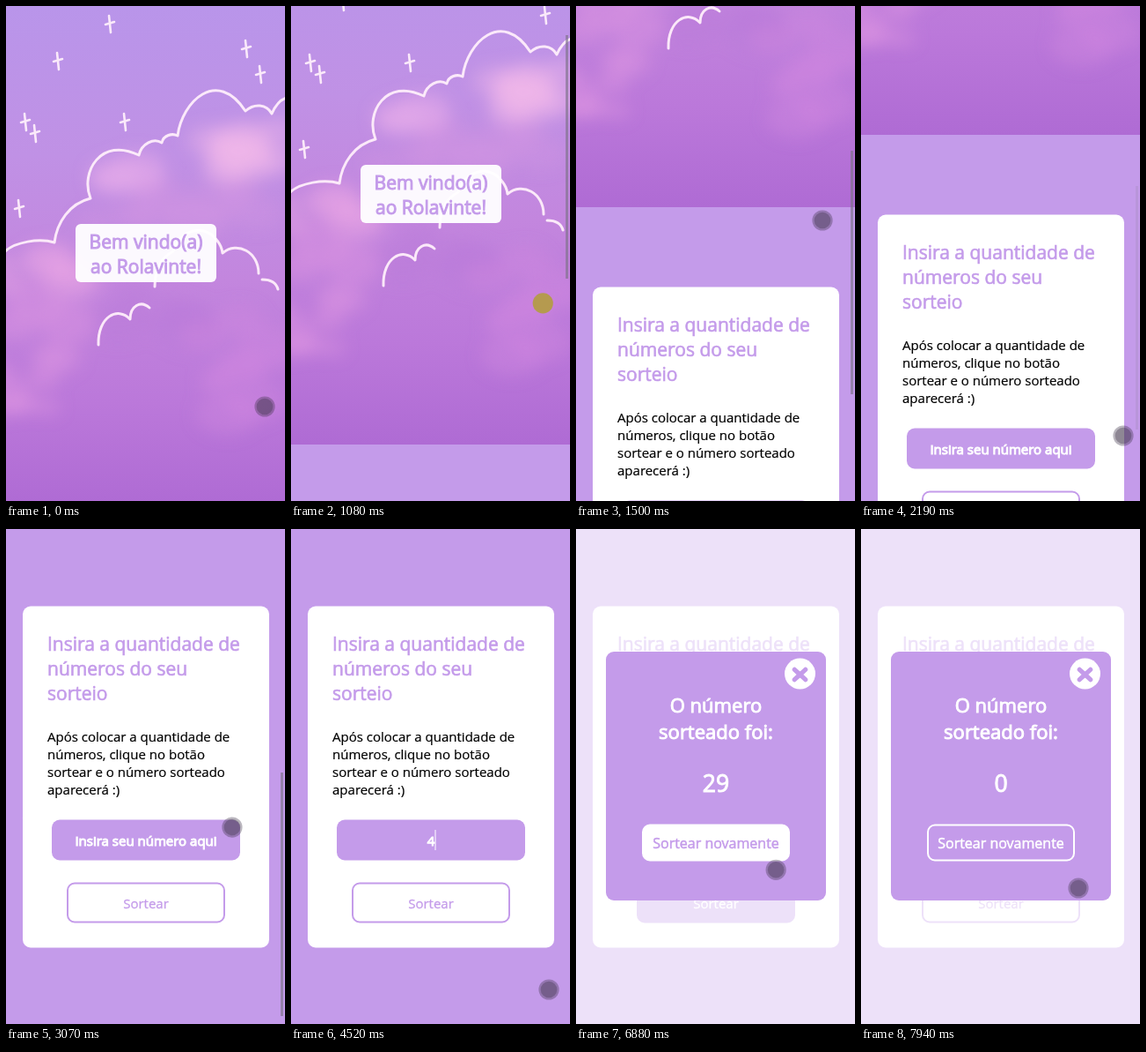
An HTML page for the animation above (8000 ms loop, 317 by 561 pixels).

```html
<!DOCTYPE html>
<html lang="pt">
<head>
<meta charset="utf-8">
<style>
  html, body { margin: 0; width: 100%; height: 100%; overflow: hidden; background: #c49bea; }
  svg { display: block; width: 317px; height: 561px; font-family: "Open Sans", "Noto Sans", sans-serif; }
  .mid { text-anchor: middle; }
  .thick { stroke: currentColor; stroke-width: 1px; }
  .semi { stroke: currentColor; stroke-width: .65px; }
  .white { fill: #fff; color: #fff; }
  .tint { fill: #c49bea; color: #c49bea; }
  .ink { fill: none; stroke: #fff0fb; stroke-width: 3; stroke-linecap: round; stroke-linejoin: round; opacity: .93; }
</style>
</head>
<body>
<svg viewBox="0 0 317 561">
  <defs>
    <linearGradient id="sky" x2="0" y2="1">
      <stop offset="0" stop-color="#b995ea"/>
      <stop offset=".3" stop-color="#c091e5"/>
      <stop offset=".55" stop-color="#c386de"/>
      <stop offset=".8" stop-color="#bb78da"/>
      <stop offset="1" stop-color="#af6bd4"/>
    </linearGradient>
    <filter id="soft" x="-30%" y="-30%" width="160%" height="160%"><feGaussianBlur stdDeviation="9"/></filter>
    <clipPath id="frame"><rect width="317" height="564"/></clipPath>
  </defs>
  <rect width="317" height="561" class="tint"/>
  <g id="page">
    <g clip-path="url(#frame)">
      <rect width="317" height="564" fill="url(#sky)"/>
      <g id="clouds" filter="url(#soft)"></g>
      <g class="ink">
        <path d="M-2 279C10 267 38 263 55 268C58 245 72 224 96 218C84 188 108 148 151 169C154 156 168 149 177 155C179 146 189 144 195 147C200 108 240 70 272 119C282 110 296 111 302 122C306 113 312 106 319 104"/>
        <path d="M169 318C169 300 176 285 190 278C200 250 228 248 240 266Q245 272 246 280C263 266 287 279 287 303"/>
        <path d="M291 310Q306 310 309 321M105 384C104 352 127 340 141 355C141 340 153 333 163 342"/>
        <path id="stars" stroke-width="2.6"/>
      </g>
      <rect x="79" y="247" width="160" height="66" rx="6" fill="#fff" opacity=".95"/>
      <g class="mid tint thick" font-size="21">
        <text x="159" y="274.5">Bem vindo(a)</text>
        <text x="159" y="302.5">ao Rolavinte!</text>
      </g>
    </g>
    <rect x="19" y="654.5" width="280" height="387" rx="9" fill="#fff"/>
    <g class="tint semi" font-size="21">
      <text x="47" y="705">Insira a quantidade de</text>
      <text x="47" y="733">números do seu</text>
      <text x="47" y="761">sorteio</text>
    </g>
    <g font-size="15" stroke="#000" stroke-width=".2">
      <text x="47" y="808">Após colocar a quantidade de</text>
      <text x="47" y="828">números, clique no botão</text>
      <text x="47" y="848">sortear e o número sorteado</text>
      <text x="47" y="868">aparecerá :)</text>
    </g>
    <rect x="52" y="896.5" width="214" height="46" rx="9" class="tint"/>
    <text id="field" class="mid white thick" x="159" y="925.5" font-size="15"></text>
    <rect id="caret" y="908" width="1" height="23" fill="#fff"/>
    <rect id="drawBox" x="70" y="968.5" width="178" height="44" rx="8" stroke="#c49bea" stroke-width="2"/>
    <text id="drawText" class="mid" x="159" y="997" font-size="15" stroke-width=".3">Sortear</text>
  </g>
  <g id="modal">
    <rect width="317" height="561" fill="#fff" opacity=".7"/>
    <rect x="34" y="139" width="250" height="282" rx="9" class="tint"/>
    <circle cx="254.5" cy="164" r="17.5" fill="#fff"/>
    <path d="M248.3 159.3l12.4 11.4m0 -11.4l-12.4 11.4" stroke="#c49bea" stroke-width="5.2" stroke-linecap="round"/>
    <g class="mid white thick">
      <text x="159" y="208" font-size="22">O número</text>
      <text x="159" y="238" font-size="22">sorteado foi:</text>
      <text id="result" x="159" y="297.5" font-size="26.5"></text>
    </g>
    <rect id="againBox" x="76" y="335.5" width="166" height="40" rx="8" stroke="#fff" stroke-width="2"/>
    <text id="againText" class="mid" x="159" y="362" font-size="16" stroke-width=".5">Sortear novamente</text>
  </g>
  <rect id="tap" fill="#33b5e5"/>
  <rect id="bar" x="312" width="3" height="276" fill="#7d7288"/>
  <g id="cursor"><circle r="11.6"/><circle r="9.3"/></g>
</svg>
<script>
const LOOP = 8000, LILAC = '#c49bea', OPEN = 5750, AGAIN = 7440;
const el = id => document.getElementById(id);
const set = (id, attrs) => { for (const k in attrs) el(id).setAttribute(k, attrs[k]); };
const ramp = (t, a, b) => Math.max(0, Math.min(1, (t - a) / (b - a)));
const smooth = k => k * k * (3 - 2 * k);
const within = (t, a, b) => t >= a && t < b;

// pointer moves: start, end, x, y
const moves = [
  [820, 1290, 280, 243], [1640, 2120, 298, 487], [2450, 2900, 266, 276],
  [2900, 3070, 257, 338], [3070, 3380, 242, 352], [3710, 4320, 293, 522],
  [4780, 5480, 170, 433], [5850, 6480, 241, 409], [6560, 7210, 213, 363], [7480, 7940, 247, 407]
];
// flings: start, end, distance
const flings = [[850, 1760, 418], [2480, 2790, 149]];
const clicks = [3570, 5600, 7410];

function pointerAt(t) {
  let x = 294, y = 454;
  for (const [a, b, nx, ny] of moves) {
    const k = ramp(t, a, b);
    x += (nx - x) * k;
    y += (ny - y) * k;
  }
  return [x, y];
}

function button(name, solid) {
  const ink = solid ? '#fff' : LILAC;
  set(name + 'Box', { fill: solid ? LILAC : '#fff' });
  set(name + 'Text', { fill: ink, stroke: ink });
}

function flash(t, start, x, y, width, height) {
  set('tap', { x, y, width, height, opacity: t < start ? 0 : .4 * (1 - ramp(t, start + 90, start + 190)) });
}

function draw(t) {
  const scroll = Math.round(flings.reduce((sum, [a, b, d]) => sum + d * smooth(ramp(t, a, b)), 0));
  const shown = Math.max(...flings.map(([a, b]) => t < a ? 0 : 1 - ramp(t, b + 310, b + 470)));
  set('page', { transform: `translate(0 ${-scroll})` });
  set('bar', { y: Math.round(scroll * .487), opacity: shown * .65 });

  const open = t >= OPEN, again = t >= AGAIN;
  const typed = t < 4520 ? '' : t < 4780 ? '4' : '40';
  el('field').textContent = typed || 'Insira seu número aqui';
  const blink = (t - (t < 4520 ? 3710 : 4520)) % 1000 < 500;
  set('caret', { x: 159 + typed.length * 4.5, opacity: within(t, 3710, OPEN) && blink ? 1 : 0 });

  button('draw', open && !again);
  button('again', again);
  set('modal', { visibility: open ? 'visible' : 'hidden' });
  el('result').textContent = again ? '0' : '29';
  if (again) flash(t, AGAIN, 75, 334.5, 168, 42);
  else flash(t, OPEN, 69, 400.5, 180, 46);

  const down = flings.some(([a]) => within(t, a, a + 480)) || clicks.some(c => within(t, c, c + 130));
  set('cursor', {
    transform: `translate(${pointerAt(t)})`,
    fill: down ? '#b59a4f' : '#40364a', 'fill-opacity': down ? 1 : .36
  });
}

let seed = 7;
const rnd = () => (seed = seed * 16807 % 2147483647) / 2147483647;

// a bank of blurred puffs scattered round one centre
function bank(x, y, w, h, fill, count) {
  for (let i = 0; i < count; i++) {
    const puff = document.createElementNS('http://www.w3.org/2000/svg', 'ellipse');
    const cx = x + (rnd() - .5) * w, cy = y + (rnd() - .5) * h, rx = 14 + rnd() * 22, ry = rx * .65;
    for (const [k, v] of Object.entries({ cx, cy, rx, ry, fill, opacity: .4 })) puff.setAttribute(k, v);
    el('clouds').append(puff);
  }
}
bank(200, 225, 200, 50, '#d093e2', 12);
bank(272, 165, 90, 55, '#f0b6e8', 12);
bank(132, 196, 45, 30, '#e6abe8', 5);
bank(40, 300, 90, 30, '#eaa9e3', 6);
bank(35, 400, 90, 130, '#de97e0', 12);
bank(160, 345, 130, 60, '#b97cda', 8);
bank(270, 400, 100, 130, '#d088de', 10);

const stars = [[118, 20], [59, 62], [273, 48], [289, 77], [135, 131], [22, 131], [33, 144], [15, 229]];
set('stars', { d: stars.map(([x, y]) => `M${x - 1} ${y - 9}l2 19M${x - 5} ${y + 1}l10 -3`).join('') });

function tick(now) {
  draw(now % LOOP);
  requestAnimationFrame(tick);
}
draw(0);
requestAnimationFrame(tick);
</script>
</body>
</html>
```
